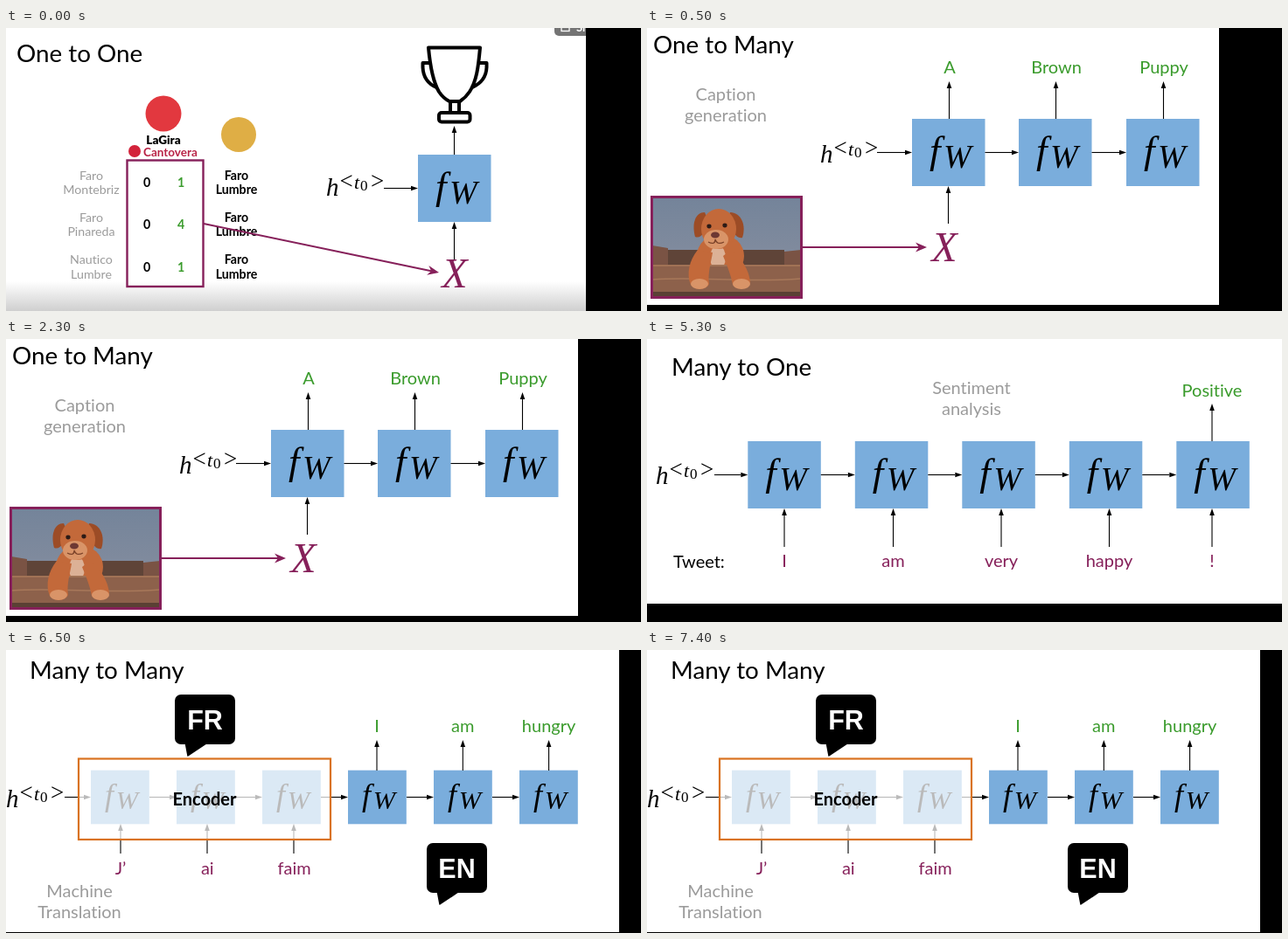
These frames come from a looping animation (726x324 px, 8 s). An HTML page:

```html
<!DOCTYPE html>
<html lang="en">
<head>
<meta charset="utf-8">
<title>Recurrent network layouts</title>
<style>
html, body { margin: 0; width: 100%; height: 100%; overflow: hidden; background: #fff; }
svg { display: block; width: 726px; height: 324px; }
text { font-family: Lato, sans-serif; font-variant-ligatures: none; white-space: pre; }
.math { font-family: "Liberation Serif", serif; font-style: italic; }
.sign { font-family: "Liberation Serif", serif; }
.sans { font-family: "Liberation Sans", Arial, sans-serif; font-weight: 700; }
</style>
</head>
<body>
<svg id="stage" viewBox="0 0 726 324" xmlns="http://www.w3.org/2000/svg"></svg>
<script>
const INK = '#000', GREY = '#9b9b9b', GREEN = '#3a9b2c', PLUM = '#86205a', BLUE = '#7aaddc';

const rect = (x, y, w, h, fill, more = '') =>
  `<rect x="${x}" y="${y}" width="${w}" height="${h}" fill="${fill}" ${more}/>`;
const path = (d, fill, more = '') => `<path d="${d}" fill="${fill}" ${more}/>`;
const oval = (x, y, rx, ry, fill, more = '') =>
  `<ellipse cx="${x}" cy="${y}" rx="${rx}" ry="${ry}" fill="${fill}" ${more}/>`;
const text = (s, x, y, size, fill = INK, more = '') =>
  `<text x="${x}" y="${y}" font-size="${size}" fill="${fill}" ${more}>${s}</text>`;
const mid = (s, x, y, fill, size = 20, more = '') =>
  text(s, x, y, size, fill, 'text-anchor="middle" ' + more);
const bold = (s, x, y, fill, size = 14.2) => mid(s, x, y, fill, size, 'font-weight="700"');
const title = (s, x, y) => text(s, x, y, 27.8);
const pair = (a, b, x, y, gap = 24) => mid(a, x, y, GREY) + mid(b, x, y + gap, GREY);

function arrow(x1, y1, x2, y2, color = INK, width = 1.1, len = 8, half = 2.8, notch = 0) {
  const d = Math.hypot(x2 - x1, y2 - y1), ux = (x2 - x1) / d, uy = (y2 - y1) / d;
  const bx = x2 - ux * len, by = y2 - uy * len;
  const nx = bx + ux * notch, ny = by + uy * notch;
  const head = `M${x2} ${y2}L${bx - uy * half} ${by + ux * half}L${nx} ${ny}` +
    `L${bx + uy * half} ${by - ux * half}Z`;
  return path(`M${x1} ${y1}L${nx} ${ny}`, 'none', `stroke="${color}" stroke-width="${width}"`) +
    path(head, color);
}
const pointer = (x1, y1, x2, y2) => arrow(x1, y1, x2, y2, PLUM, 2, 13, 5.5, 4);

const cell = (x, y, scale = 1) => `<g transform="translate(${x} ${y}) scale(${scale})">` +
  rect(0, 0, 83.5, 77, BLUE) +
  text('f', 20, 51, 45, INK, 'class="math"') +
  text('W', 36, 56, 38, INK, 'class="math"') + '</g>';

const state = (x, y) =>
  text('h', x, y, 29, INK, 'class="math"') +
  text('&lt;', x + 15.5, y - 8, 27, INK, 'class="sign"') +
  text('t', x + 32, y - 8.5, 22, INK, 'class="math"') +
  text('0', x + 39, y - 6, 17, INK, 'class="sign"') +
  text('&gt;', x + 51, y - 8, 27, INK, 'class="sign"');

const input = (x, y) => mid('X', x, y, PLUM, 48, 'class="math"');

function trophy() {
  const line = 'stroke="#000" stroke-width="4" stroke-linejoin="round" stroke-linecap="round"';
  return path('M483 22.5H542C540 45 538 61 530 73C526 79 522 82 519 84H507C503 82 499 79 495 73C488 61 485 45 483 22.5Z', 'none', line) +
    path('M484 40H476.5V45C477 57 483 64 492 68M541 40H549.5V45C549 57 542 64 533 68', 'none', line) +
    path('M508 84V96M518 84V96', 'none', line) +
    rect(495, 97, 35.5, 10.5, 'none', 'rx="3" ' + line);
}

function puppy() {
  const fur = '#c3693a', dark = '#9c4c26', light = '#d99468', wood = '#8d614b';
  return `<defs><linearGradient id="wall" x2="0" y2="1">
      <stop stop-color="#74849a"/><stop offset="1" stop-color="#8a90a0"/></linearGradient>
      <clipPath id="photo">${rect(6, 194, 170, 114, INK)}</clipPath></defs>
    <g clip-path="url(#photo)">` +
    rect(6, 194, 170, 114, 'url(#wall)') +
    path('M24 254H157V276H24Z', '#5f4438') +
    path('M6 249L24 252V272L6 278Z M176 254L157 256V272L176 276Z', '#7a5344') +
    oval(84, 261, 27, 25, fur) +
    oval(81, 263, 9, 14, '#dcb196') +
    path('M6 271H176V303H6Z', wood) +
    path('M6 272H176M6 288C60 284 110 292 176 287', 'none', 'stroke="#a8785a" stroke-width="1.5"') +
    rect(6, 302, 170, 6, '#5a4034') +
    path('M58 254C48 266 45 282 50 294C55 301 68 300 71 293C69 280 74 266 75 257Z', fur) +
    path('M96 254C108 262 117 278 118 291C115 299 103 301 98 294C96 282 90 268 87 261Z', fur) +
    oval(60, 293, 10, 6, light) + oval(108, 293, 10, 6, light) +
    path('M66 211C55 211 51 224 55 239C62 242 68 232 70 220Z', dark) +
    path('M95 211C107 211 114 225 109 240C102 242 97 232 93 220Z', dark) +
    oval(82, 230, 20, 23, fur) +
    oval(79, 242, 14, 11, light) +
    oval(78, 237, 5, 3.5, '#6d3833') +
    oval(71, 227, 2.6, 2.4, '#2d1b16') + oval(89, 226, 2.6, 2.4, '#2d1b16') +
    path('M70 245Q78 249 78 242Q80 249 88 245', 'none', 'stroke="#7b4229" stroke-width="1.3"') +
    '</g>' + rect(5.5, 193.5, 171, 115, 'none', `stroke="${PLUM}" stroke-width="3"`);
}

function bubble(x, y, s) {
  return rect(x, y, 69, 57, INK, 'rx="7"') +
    path(`M${x + 12} ${y + 54}L${x + 15} ${y + 70}L${x + 36} ${y + 56}Z`, INK,
      'stroke="#000" stroke-width="1.5" stroke-linejoin="round"') +
    mid(s, x + 34.5, y + 39.5, '#fff', 30.5, 'class="sans"');
}

function oneToOne() {
  const rows = [['Faro', 'Montebriz', 1], ['Faro', 'Pinareda', 4], ['Nautico', 'Lumbre', 1]];
  const table = rows.map(([a, b, n], i) => {
    const y = 173.5 + i * 48.3;
    return mid(a, 97.5, y, GREY, 14.2) + mid(b, 97.5, y + 16.5, GREY, 14.2) +
      bold(0, 161, y + 8.5, INK) + bold(n, 200, y + 8.5, GREEN) +
      bold('Faro', 263.5, y, INK) + bold('Lumbre', 263.5, y + 16.5, INK);
  }).join('');
  return `<defs><linearGradient id="floor" x2="0" y2="1">
      <stop stop-color="#fff"/><stop offset="1" stop-color="#cfcfcf"/></linearGradient></defs>` +
    rect(0, 290, 663, 34, 'url(#floor)') +
    title('One to One', 12, 38.5) +
    oval(180, 98, 20.5, 20.5, '#e2383f') +
    mid('LaGira', 180, 133, INK, 13.5, 'font-weight="900"') +
    oval(147, 141, 7, 7, '#d3233b') +
    text('Cantovera', 157, 147, 13.5, '#b82346', 'font-weight="700"') +
    oval(266, 122, 20, 20, '#dfae45') +
    table +
    rect(138.5, 151.5, 87, 144.5, 'none', `stroke="${PLUM}" stroke-width="2.4"`) +
    pointer(226, 224, 495, 280) +
    trophy() +
    arrow(512.5, 145, 512.5, 112) + arrow(512.5, 266, 512.5, 222) +
    cell(471, 145) + state(366, 192) + arrow(432, 183.5, 471, 183.5) +
    input(513, 297) +
    rect(627, -10, 45, 19, '#747474', 'rx="5"') +
    rect(635, -4, 9, 7.5, 'none', 'stroke="#fff" stroke-width="1.3"') +
    text('Sh', 652, 3.5, 13, '#fff', 'font-weight="700"') +
    rect(663, 0, 63, 324, INK);
}

function oneToMany() {
  const xs = [303, 425, 548];
  return title('One to Many', 7, 28.5) +
    pair('Caption', 'generation', 90, 82.5) +
    state(198, 154) +
    ['A', 'Brown', 'Puppy'].map((s, i) => {
      const x = xs[i], from = i ? xs[i - 1] + 83.5 : 263;
      return arrow(from, 142.5, x, 142.5) + cell(x, 104) +
        arrow(x + 42.5, 104, x + 42.5, 61) + mid(s, x + 43, 52, GREEN);
    }).join('') +
    arrow(344.5, 224, 344.5, 181) + input(340, 267) +
    pointer(177, 251, 320, 251) +
    puppy() +
    rect(654, 0, 72, 324, INK) + rect(0, 317, 726, 7, INK);
}

function manyToOne() {
  const stems = [157, 281.5, 405, 528.5, 646];
  return title('Many to One', 28, 41.5) +
    pair('Sentiment', 'analysis', 371, 63) +
    state(10, 166) +
    ['I', 'am', 'very', 'happy', '!'].map((s, i) => {
      const x = 115.3 + i * 122.5, from = i ? x - 39 : 77;
      return arrow(from, 155.5, x, 155.5) + cell(x, 117) +
        arrow(stems[i], 238, stems[i], 194) + mid(s, stems[i], 260.5, PLUM);
    }).join('') +
    arrow(646, 117, 646, 74) + mid('Positive', 646, 65.5, GREEN) +
    text('Tweet:', 30, 262, 20) +
    rect(0, 303, 726, 21, INK);
}

function manyToMany() {
  const x = i => 97 + i * 98;
  const cells = [0, 1, 2, 3, 4, 5].map(i =>
    arrow(i ? x(i) - 31 : 67, 168.5, x(i), 168.5) + cell(x(i), 137.7, 0.8)).join('');
  const words = ['J’', 'ai', 'faim'].map((s, i) =>
    arrow(131 + i * 99, 233, 131 + i * 99, 199) + mid(s, 131 + i * 99.3, 257, PLUM)).join('');
  const out = ['I', 'am', 'hungry'].map((s, i) =>
    arrow(424 + i * 98.3, 138, 424 + i * 98.3, 103) + mid(s, 424 + i * 98.3, 94, GREEN)).join('');
  return title('Many to Many', 27, 32.5) +
    state(0, 180) + cells + words + out +
    rect(83, 125, 288, 92, '#fff', 'fill-opacity=".73"') +
    rect(83, 124.5, 288, 92.5, 'none', 'stroke="#d9721f" stroke-width="2.2"') +
    bold('Encoder', 227, 177.5, INK, 20) +
    bubble(193, 51, 'FR') + bubble(481, 221, 'EN') +
    pair('Machine', 'Translation', 84, 283) +
    rect(701, 0, 25, 324, INK) + rect(0, 323, 726, 1, INK);
}

const LOOP = 8000;
const starts = [0, 500, 3500, 6500];
const stage = document.getElementById('stage');
stage.innerHTML = [oneToOne, oneToMany, manyToOne, manyToMany]
  .map(draw => `<g>${rect(0, 0, 726, 324, '#fff')}${draw()}</g>`).join('');
const slides = [...stage.children];

function show(ms) {
  const now = starts.filter(s => s <= ms).length - 1;
  slides.forEach((g, i) => g.setAttribute('visibility', i === now ? 'visible' : 'hidden'));
}

const begin = performance.now();
function tick() {
  show((performance.now() - begin) % LOOP);
  requestAnimationFrame(tick);
}
tick();
</script>
</body>
</html>
```
